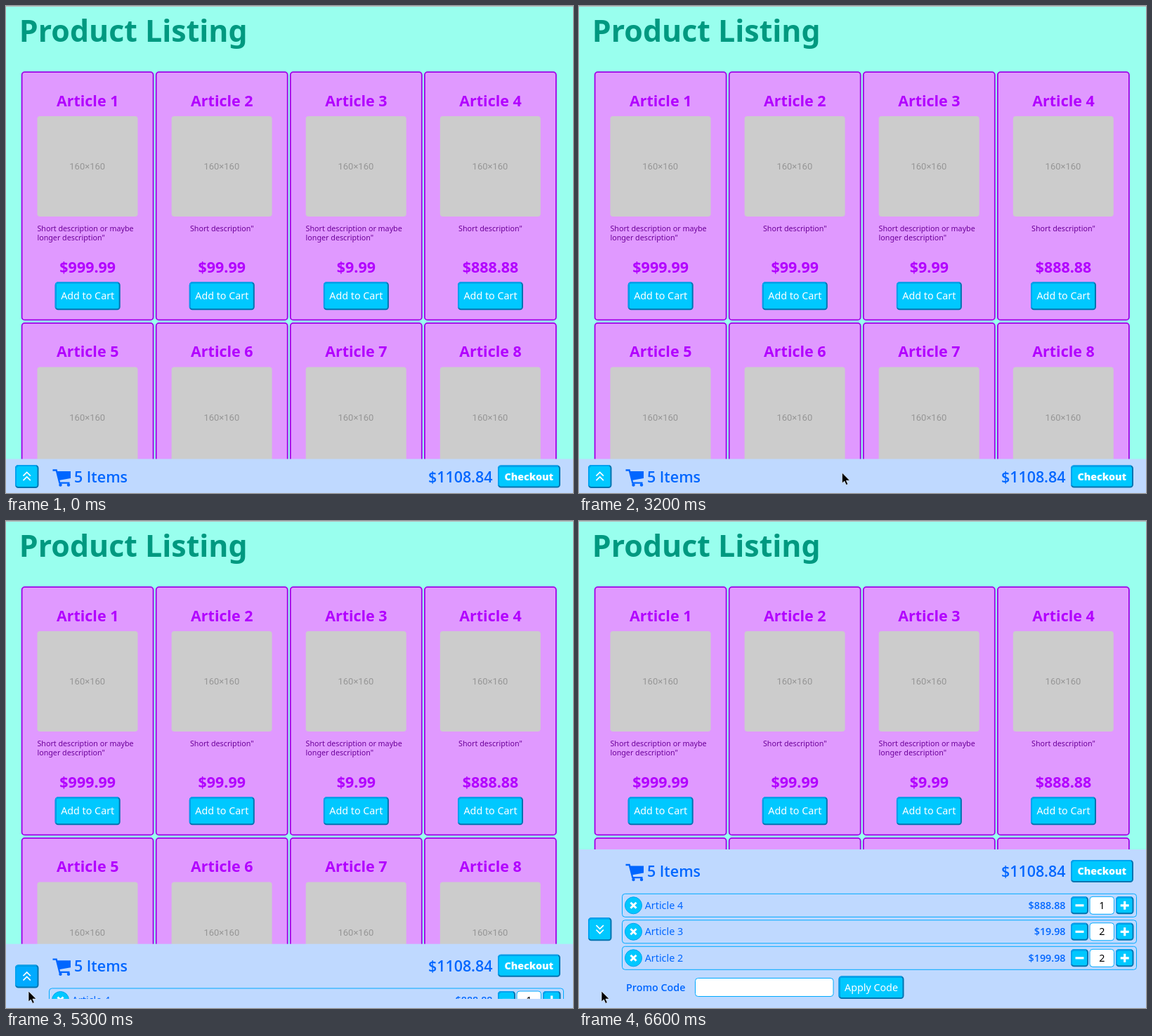
Recreate the animation shown at these times as an HTML page. Size 807 by 694 pixels, loop 8000 ms.

```html
<!DOCTYPE html>
<html lang="en">
<head>
<meta charset="utf-8">
<title>Product Listing</title>
<style>
  html, body { margin: 0; height: 100%; overflow: hidden; background: #99ffee; }
  svg { display: block; width: 100%; height: 100%; }
  text { font: 14.3px "Noto Sans", "Open Sans", sans-serif; white-space: pre; }
  .title { font-size: 42.9px; font-weight: 700; fill: #009980; }
  .name { font-size: 21.45px; font-weight: 700; fill: #b200ff; }
  .size { font: 13px Roboto, sans-serif; font-stretch: 75%; fill: #969696; }
  .desc { font-size: 10.72px; fill: #6b0099; }
  .label { fill: #fff; }
  .strong { font: 800 14.3px "Open Sans", "Noto Sans", sans-serif; fill: #fff; }
  .item { fill: #0066ff; }
  .semi { font: 600 14.3px "Open Sans", "Noto Sans", sans-serif; fill: #0066ff; }
  .big { font: 600 21.45px "Open Sans", "Noto Sans", sans-serif; fill: #0066ff; }
  .mid { text-anchor: middle; }
  .end { text-anchor: end; }
</style>
</head>
<body>
<svg id="stage" viewBox="0 0 807 694" xmlns="http://www.w3.org/2000/svg"></svg>
<script>
const FILL = '#00c8ff', HOVER = '#00aaff', LIGHT = '#00a2f0', DARK = '#0074b0';
const LOOP = 8000, BOTTOM = 694, CLOSED = 645.5, OPEN = 468;

const text = (x, y, cls, str) => `<text x="${x}" y="${y}" class="${cls}">${str}</text>`;
const rect = (x, y, w, h, attrs) =>
  `<rect x="${x}" y="${y}" width="${w}" height="${h}" ${attrs}/>`;
const path = (d, color, width) =>
  `<path d="${d}" fill="none" stroke="${color}" stroke-width="${width}"/>`;
const at = (x, y, content) => `<g transform="translate(${x} ${y})">${content}</g>`;

// Raised button: dark frame with a light top and left edge
const button = (x, y, w, h, id = '') =>
  `<g id="${id}">` +
  rect(x + 1, y + 1, w - 2, h - 2, `rx="3.5" fill="${FILL}" stroke="${DARK}" stroke-width="2" class="face"`) +
  `<path class="edge" d="M${x + 1} ${y + h - 3}V${y + 4.5}q0 -3.5 3.5 -3.5H${x + w - 3}"
    fill="none" stroke="${LIGHT}" stroke-width="2"/></g>`;

const field = (x, y, w, h) =>
  rect(x + .5, y + .5, w - 1, h - 1, 'rx="4" fill="#fff" stroke="#00aaff"');

const longText = ['Short description or maybe', 'longer description"'];
const prices = ['$999.99', '$99.99', '$9.99', '$888.88'];

function card(i) {
  const col = i % 4, row = Math.floor(i / 4);
  const desc = col % 2
    ? text(94.5, 227.5, 'desc mid', 'Short description"')
    : longText.map((s, n) => text(22.7, 227.5 + n * 13.4, 'desc', s)).join('');
  return at(21.7 + col * 191.1, 93.3 + row * 357.7,
    rect(.9, .9, 187, 353.2, 'rx="4" fill="#e099ff" stroke="#a000e6" stroke-width="1.8"') +
    text(94.5, 49.3, 'name mid', `Article ${i + 1}`) +
    rect(22.8, 63.6, 143, 143, 'rx="4" fill="#ccc"') +
    text(94, 140, 'size mid', '160×160') +
    desc +
    text(94.5, 286.4, 'name mid', prices[col]) +
    button(48, 300, 93, 40) +
    text(94.5, 325, 'label mid', 'Add to Cart'));
}

function cartRow([name, price, count], i) {
  return at(0, 547.8 + i * 37.5,
    rect(61.5, -16.5, 732, 33, 'rx="4" fill="none" stroke="#00aaff"') +
    `<circle cx="77.5" r="12" fill="${FILL}" stroke="${LIGHT}"/>` +
    path('M73.5 -4l8 8m0 -8l-8 8', '#fff', 3) +
    text(93.7, 5, 'item', name) +
    text(692.5, 5, 'semi end', price) +
    button(700, -12.5, 25, 25) + path('M706.5 0h12', '#fff', 3.2) +
    field(726.5, -13, 35.5, 26) + text(744.3, 5, 'mid', count) +
    button(764, -12.5, 25.5, 25) + path('M770.7 0h12m-6 -6v12', '#fff', 3.2));
}

const cartIcon =
  path('M66.5 490h5.2l4.6 18.2h14.2', '#0066ff', 2.3) +
  '<path d="M71.5 491.5H92V501.5L75 504.5Z" fill="#0066ff"/>' +
  '<circle cx="77.5" cy="511" r="2.2" fill="#0066ff"/><circle cx="89" cy="511" r="2.2" fill="#0066ff"/>';

const cart = [['Article 4', '$888.88', 1], ['Article 3', '$19.98', 2], ['Article 2', '$199.98', 2]];

document.getElementById('stage').innerHTML =
  '<clipPath id="window"><rect width="807" height="681"/></clipPath>' +
  rect(0, 0, 807, 694, 'fill="#99ffee"') +
  rect(0, 0, 807, 1, 'fill="#b5b9b8"') +
  text(18.8, 50.5, 'title', 'Product Listing') +
  Array.from({ length: 8 }, (_, i) => card(i)).join('') +
  rect(0, 0, 807, 694, 'id="bar" fill="#bfd9ff"') +
  '<g id="header">' + cartIcon +
    text(97, 507, 'big', '5 Items') +
    text(692.5, 507, 'big end', '$1108.84') +
    button(700, 483, 89, 32, 'checkout') +
    text(744.3, 504, 'strong mid', 'Checkout') + '</g>' +
  '<g clip-path="url(#window)"><g id="list">' + cart.map(cartRow).join('') +
    text(67, 669.7, 'semi', 'Promo Code') +
    field(165, 651, 197.5, 27) +
    button(369.5, 648.5, 93, 32.5) +
    text(416, 669.7, 'label mid', 'Apply Code') + '</g></g>' +
  '<g id="toggle">' + button(13, -16.5, 33.5, 33, 'toggleButton') +
    '<g id="chevrons">' + path('M24.5 -.8l5.2 -5.2l5.2 5.2m-10.4 6.4l5.2 -5.2l5.2 5.2', '#fff', 1.7) + '</g></g>' +
  '<path id="arrow" d="M0 0V15l3.4 -3l2.4 5.4l2.5 -1.1l-2.4 -5.2H11Z" stroke="#e8f0ff" stroke-width=".7"/>' +
  '<path id="beam" d="M-3 -8.5h2.3l.7 .6l.7 -.6h2.3m-3 .5v16m-3 .5h2.3l.7 -.6l.7 .6h2.3" fill="none" stroke="#000" stroke-width="1.2"/>';

const el = Object.fromEntries([...document.querySelectorAll('[id]')].map(e => [e.id, e]));
const clamp = v => Math.min(1, Math.max(0, v));
const move = (node, x, y) => node.setAttribute('transform', `translate(${x} ${y})`);
const show = (node, on) => node.setAttribute('visibility', on ? 'visible' : 'hidden');

// Pointer route: time, x, y, and the power of the easing towards that point
const route = [
  [1200, 830, 700], [1300, 805, 689, 1], [1500, 805, 688, 1], [1700, 804, 687, 1],
  [1900, 804, 687, 1], [2000, 802, 686, 1], [2300, 793, 683, 1.6],
  [2800, 626, 662, 1.6], [3700, 60, 669, 1], [4100, 32, 670, .6]
];

function pointer(t) {
  const i = route.findIndex(p => p[0] >= t);
  if (i === 0) return [830, 700];
  if (i < 0) return route[route.length - 1].slice(1, 3);
  const [t0, x0, y0] = route[i - 1], [t1, x1, y1, power] = route[i];
  const k = ((t - t0) / (t1 - t0)) ** power;
  return [x0 + (x1 - x0) * k, y0 + (y1 - y0) * k];
}

function paint(button, hover, pressed) {
  const face = button.querySelector('.face');
  face.setAttribute('fill', hover ? HOVER : FILL);
  face.setAttribute('stroke', pressed ? LIGHT : DARK);
  button.querySelector('.edge').setAttribute('stroke', pressed ? DARK : LIGHT);
}

function draw(time) {
  const t = Math.floor(time / 100) * 100;
  const slide = t < 5200 ? 0 : .5 - Math.cos(Math.PI * clamp((t - 5086) / 655)) / 2;
  const top = CLOSED + (OPEN - CLOSED) * slide;
  el.bar.setAttribute('y', top);
  move(el.header, 0, top - OPEN - (slide ? 0 : 6));
  move(el.list, 0, top - OPEN);
  show(el.list, slide > 0);
  move(el.toggle, 0, (top + BOTTOM) / 2 + .7);
  el.chevrons.setAttribute('transform', `scale(1 ${t >= 6600 ? -1 : 1})`);

  const [x, y] = pointer(t);
  paint(el.toggleButton, x < 46 && t < 6600, t >= 5000 && t < 5200);
  paint(el.checkout, x > 700 && x < 789 && y < 686, false);
  const overText = (x > 601 && x < 693) || (x > 97 && x < 173);
  show(el.beam, overText);
  show(el.arrow, !overText);
  move(el.beam, x, y);
  move(el.arrow, x, y);
}

let start;
function tick(now) {
  start ??= now;
  draw((now - start) % LOOP);
  requestAnimationFrame(tick);
}
draw(0);
requestAnimationFrame(tick);
</script>
</body>
</html>
```
